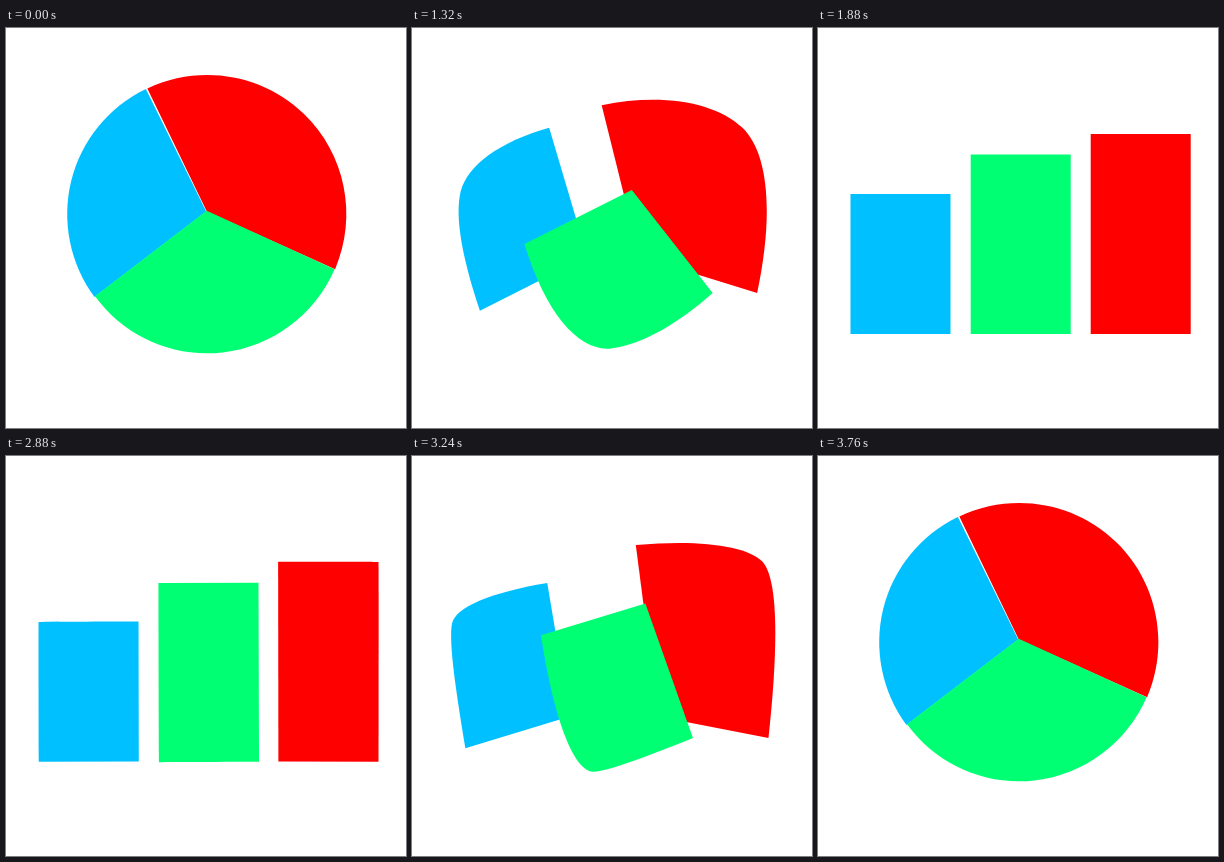
Write an HTML page that moves like this. It is 400x400 px and loops after 3800 ms.

```html
<!DOCTYPE html>
<html lang="en">
<head>
<meta charset="utf-8">
<title>Pie to bars</title>
<style>
  html, body { margin: 0; width: 100%; height: 100%; overflow: hidden; background: #fff; }
  svg { display: block; width: 100%; height: 100%; }
</style>
</head>
<body>
<svg viewBox="0 0 400 400">
  <path id="red" fill="#ff0000"/>
  <path id="blue" fill="#00c0ff"/>
  <path id="green" fill="#00ff72"/>
</svg>
<script>
const LOOP = 3800, STEP = 40, STEPS = 24;
const CENTER = [200.8, 186], APEX = [200.5, 183], RADIUS = 139.4;
const BOTTOM = 306, BAR_WIDTH = 100;

const mix = (a, b, p) => a.map((v, i) => v + (b[i] - v) * p);
const add = (a, b, k = 1) => a.map((v, i) => v + b[i] * k);
const rad = deg => deg * Math.PI / 180;
const onCircle = deg => add(CENTER, [Math.cos(rad(deg)), Math.sin(rad(deg))], RADIUS);
const tangent = deg => [-Math.sin(rad(deg)), Math.cos(rad(deg))];

// A wedge runs clockwise from one angle to another; the middle of its arc becomes
// the bar corner named by `corner`, counted clockwise from the top left.
function makeShape(id, from, to, left, top, corner, drift) {
  const right = left + BAR_WIDTH;
  const box = [[left, top], [right, top], [right, BOTTOM], [left, BOTTOM]];
  const at = i => box[(corner + i + 4) % 4];
  const mid = (from + to) / 2;
  const handle = 4 / 3 * Math.tan(rad((to - from) / 8)) * RADIUS;
  const reach = (deg, sign) => add(onCircle(deg), tangent(deg), sign * handle);
  // start point, end point, share of the sideways drift
  const points = [
    [APEX, at(2), 0],
    [onCircle(from), at(-1), 0],
    [reach(from, 1), mix(at(-1), at(0), 2 / 3), 0.5],
    [reach(mid, -1), at(0), 1],
    [onCircle(mid), at(0), 1],
    [reach(mid, 1), at(0), 1],
    [reach(to, -1), mix(at(1), at(0), 2 / 3), 0.5],
    [onCircle(to), at(1), 0]
  ];
  const path = document.getElementById(id);
  return p => {
    const [apex, start, ...curve] = points.map(([a, b, share]) =>
      add(mix(a, b, p), drift, share * 4 * p * (1 - p)).map(v => v.toFixed(2)));
    path.setAttribute('d', `M${apex} L${start} C${curve.join(' ')}Z`);
  };
}

const shapes = [
  makeShape('red', -115.5, 23.2, 272.7, 106, 1, [5.3, 7]),
  makeShape('blue', 143.5, 244.1, 32.5, 166, 0, [-4.8, 6]),
  makeShape('green', 23.2, 143.5, 152.7, 126.4, 3, [6.3, 3])
];

function stepAt(t) {
  if (t < 1000) return 1;
  if (t < 1880) return 2 + Math.floor((t - 1000) / STEP);
  if (t < 2880) return STEPS;
  return STEPS - 1 - Math.floor((t - 2880) / STEP);
}

function draw(t) {
  const progress = (1 - Math.cos(Math.PI * stepAt(t) / STEPS)) / 2;
  shapes.forEach(shape => shape(progress));
}

const begin = performance.now();
function tick() {
  draw((performance.now() - begin) % LOOP);
  requestAnimationFrame(tick);
}
tick();
</script>
</body>
</html>
```
